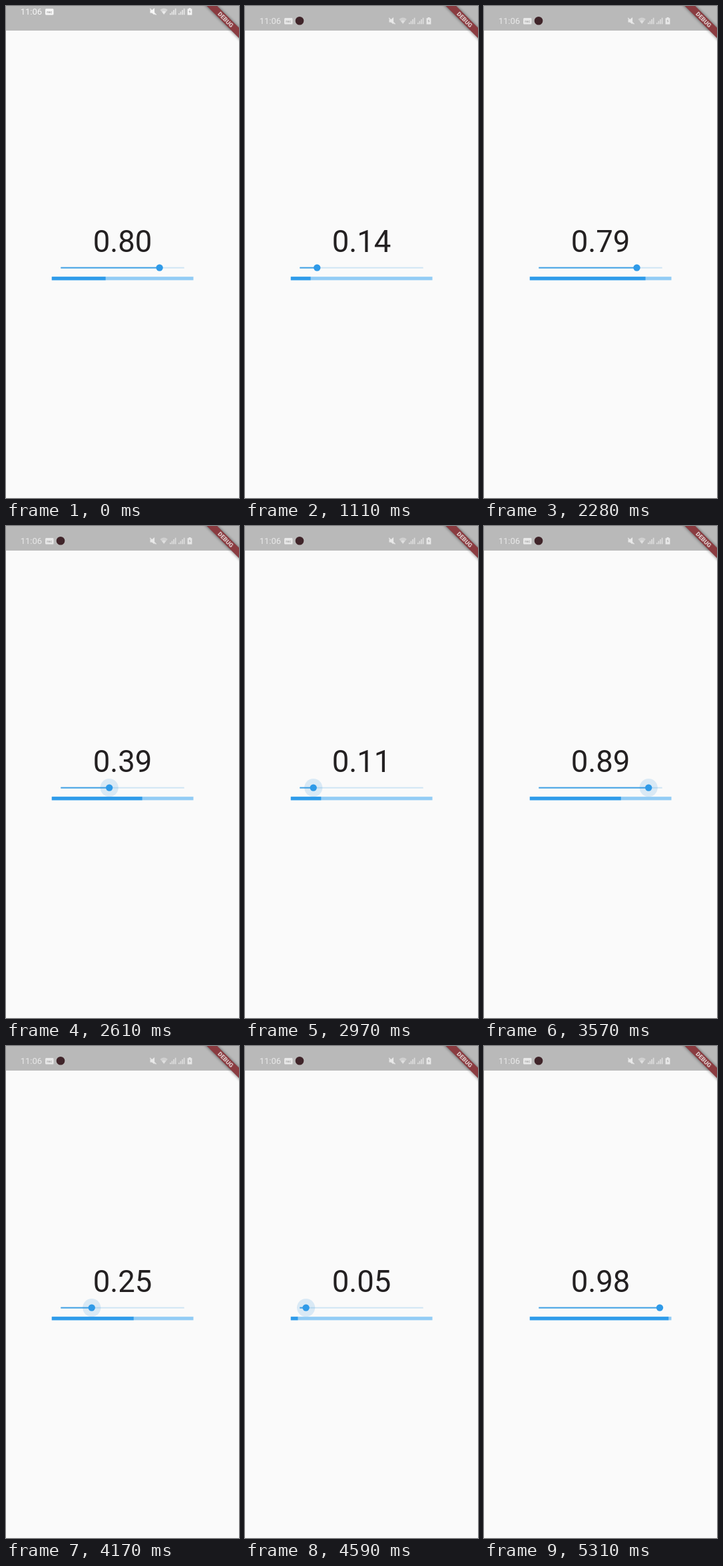
Write an HTML page that moves like this. It is 350x740 px and loops after 6 s.

```html
<!DOCTYPE html>
<html lang="en">
<head>
<meta charset="utf-8">
<title>Slider and progress bar</title>
<style>
  html, body { margin: 0; width: 100%; height: 100%; overflow: hidden; background: #fafafa; }
  svg { display: block; width: 350px; height: 740px; font-family: Roboto, sans-serif; }
</style>
</head>
<body>
<svg viewBox="0 0 350 740">
  <defs>
    <filter id="soft" x="-20%" y="-100%" width="140%" height="300%">
      <feGaussianBlur stdDeviation="2"/>
    </filter>
    <clipPath id="top"><rect width="350" height="37"/></clipPath>
  </defs>
  <rect width="350" height="740" fill="#fafafa"/>
  <rect width="350" height="37" fill="#b9b9b9"/>

  <g clip-path="url(#top)">
    <g id="status">
      <g id="icons" fill="#f6f6f6">
        <text x="21.7" y="27.2" font-size="13">11:06</text>
        <rect x="59" y="18" width="12.5" height="9.5" rx="1.5"/>
        <text x="65.2" y="24.6" font-size="5.5" font-weight="700" text-anchor="middle" fill="#a8a8a8">rec</text>
        <path d="M216.5 20.2h2.6l4-3.2v10.6l-4-3.2h-2.6z"/>
        <path d="M216.2 18l9.4 9.2" stroke="#f6f6f6" stroke-width="1.2"/>
        <path d="M231.5 19.8q5.7-4.6 11.4 0l-5.7 7z" opacity=".5"/>
        <path d="M234.3 22.8q2.9-2.2 5.8 0l-2.9 4z" opacity=".6"/>
        <path id="signal" opacity=".75"/>
        <path d="M274.6 17h3v1.2h1.8v9.2h-6.8v-9.2h2z"/>
        <path d="M276.4 19.6l-1.9 3.4h1.4l-.4 2.8 2.1-3.5h-1.4z" fill="#b0b0b0"/>
      </g>
      <circle id="badge" cx="82" cy="22.3" r="6.3" fill="#40252a"/>
    </g>
  </g>

  <g transform="translate(330 20.5) rotate(45)">
    <rect x="-45" y="-5.5" width="90" height="11.5" opacity=".5" filter="url(#soft)"/>
    <rect x="-45" y="-5.5" width="90" height="11" fill="#8a3b40"/>
    <text y="3.2" font-size="9" font-weight="900" text-anchor="middle" fill="#dccaca">DEBUG</text>
  </g>

  <text id="label" x="175" y="369.7" font-size="45.5" text-anchor="middle" fill="#232021"></text>

  <rect x="82.3" y="392.7" width="185.4" height="2" fill="#cfe5f4"/>
  <rect id="track" x="82.3" y="392.7" height="2" fill="#45a3e4"/>
  <circle id="halo" cy="393.6" fill="#2f93dd" fill-opacity=".16"/>
  <circle id="thumb" cy="393.6" r="5.2" fill="#2f9ae8"/>

  <rect x="68.8" y="407.2" width="212.7" height="5.2" fill="#92ccf5"/>
  <rect id="bar" x="68.8" y="407.2" height="5.2" fill="#2f9bea"/>
</svg>
<script>
const LOOP = 6000, FRAME = 30, TICK = 10, FOLLOW = 200;
const $ = id => document.getElementById(id);
const clamp = x => Math.max(0, Math.min(1, x));
const swing = p => (1 - Math.cos(Math.PI * p)) / 2;

// [start, duration, new value]: taps jump, drags swing
const moves = [
  [900, 0, .14], [1740, 0, .817], [2280, 0, .794],
  [2290, 590, .086], [2880, 850, .964], [3730, 638, .05],
  [5070, 0, .98]
];
const presses = [[900, 980], [1740, 1800], [2290, 4725], [5070, 5180]];

function valueAt(t) {
  let v = .8;
  for (const [at, span, to] of moves)
    if (t >= at) v += (to - v) * (span ? swing(clamp((t - at) / span)) : 1);
  return v;
}

// The bar runs to its goal in FOLLOW ms and starts afresh when the goal moves.
function followValue() {
  const path = [];
  let from = 0, since = -95, goal = valueAt(0);
  for (let t = 0; t < LOOP; t += TICK) {
    const pos = from + (goal - from) * clamp((t - since) / FOLLOW);
    const next = valueAt(t);
    if (next !== goal) [from, since, goal] = [pos, t, next];
    path.push(pos);
  }
  return path;
}

function haloSize(t) {
  return Math.max(...presses.map(([down, up]) =>
    Math.min(clamp((t - down) / 100), clamp((up + 100 - t) / 100))));
}

function signalPath() {
  let d = "";
  for (const x of [246, 259])
    for (let i = 0; i < 4; i++) {
      const h = 2.4 + i * 2.4;
      d += `M${x + i * 2.6} ${27.3 - h}h1.7v${h}h-1.7z`;
    }
  return d;
}

const barPath = followValue();

function draw(t) {
  const v = valueAt(t);
  const x = 82.3 + 185.4 * v;
  $("label").textContent = v.toFixed(2);
  $("track").setAttribute("width", x - 82.3);
  $("thumb").setAttribute("cx", x);
  $("halo").setAttribute("cx", x);
  $("halo").setAttribute("r", 13.6 * haloSize(t));
  $("bar").setAttribute("width", 212.7 * barPath[t / TICK]);

  const rest = 1 - clamp(t / 330);
  $("status").setAttribute("transform", `translate(0 ${-14 * rest * rest})`);
  $("icons").setAttribute("opacity", .78 + .22 * rest);
  $("badge").setAttribute("opacity", clamp((t - 180) / 200));
}

$("signal").setAttribute("d", signalPath());
const start = performance.now();
function tick() {
  const t = (performance.now() - start) % LOOP;
  draw(Math.floor(t / FRAME) * FRAME);
  requestAnimationFrame(tick);
}
tick();
</script>
</body>
</html>
```
